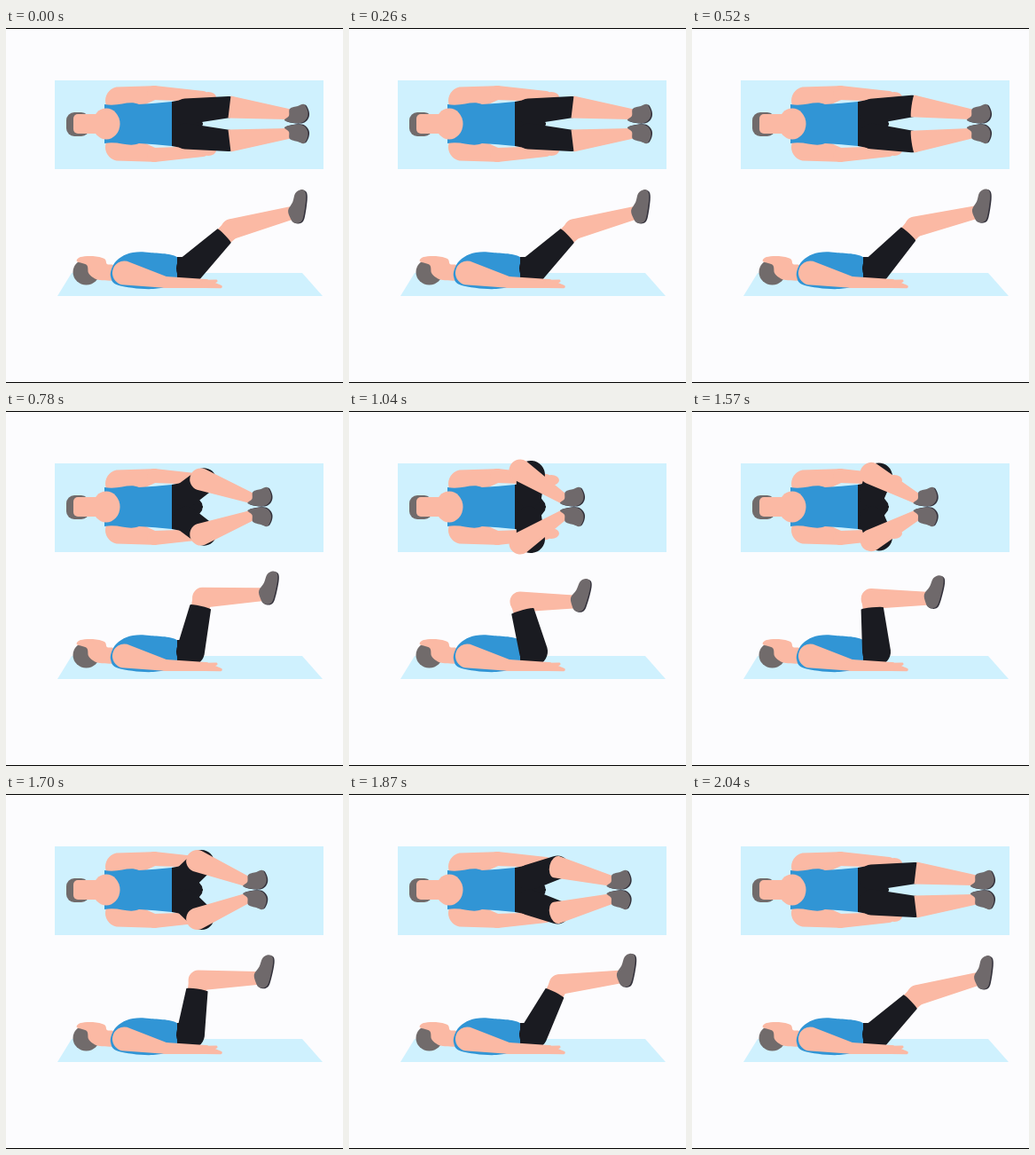
Animation, 380 px wide and 400 px high, one loop 2.14 s. Source, as an HTML page with a canvas:

```html
<!DOCTYPE html>
<html lang="en">
<head>
<meta charset="utf-8">
<title>Lying knee tuck</title>
<style>
html, body { margin: 0; width: 100%; height: 100%; overflow: hidden; background: #fcfcfe; }
canvas { display: block; }
</style>
</head>
<body>
<canvas id="stage" width="380" height="400"></canvas>
<script>
const ctx = document.getElementById('stage').getContext('2d');
const LOOP = 2140, STEPS = 13, MOVE = 520, DEG = Math.PI / 180;
const SKIN = '#fbb9a4', SHIRT = '#3195d5', SHORTS = '#1a1b21', HAIR = '#716b6b',
      SHOE = '#6f696b', SOLE = '#34323c', MAT = '#cff1fe';

const TOP_SHOE = [[-27, -4], [-22, -9], [-21, -17], [-12, -20], [-5, -22], [-1, -15], [-1, -8], [-6, -2], [-16, -1]];
const SIDE_SHOE = [[-11, 3], [-6, -6], [-3, -16], [3, -20], [8, -18], [9, -9], [6, 11], [2, 17], [-5, 17], [-9, 11]];

const lerp = (a, b, p) => a + (b - a) * p;
const mix = (a, b, p) => [lerp(a[0], b[0], p), lerp(a[1], b[1], p)];
const polar = ([x, y], angle, len) => [x + len * Math.cos(angle), y - len * Math.sin(angle)];

function fill(color, trace) {
  ctx.beginPath();
  trace();
  ctx.fillStyle = color;
  ctx.fill();
}

const rect = (color, x, y, w, h, r = 0) => fill(color, () => ctx.roundRect(x, y, w, h, r));
const oval = (color, x, y, rx, ry) => fill(color, () => ctx.ellipse(x, y, rx, ry, 0, 0, 2 * Math.PI));
const poly = (color, pts) => fill(color, () => pts.forEach(q => ctx.lineTo(...q)));

// Smooth closed curve through the points
function blob(color, pts) {
  const n = pts.length, at = i => pts[(i + n) % n];
  const handle = (i, s) => at(i).map((v, k) => v + s * (at(i + 1)[k] - at(i - 1)[k]) / 6);
  fill(color, () => {
    ctx.moveTo(...pts[0]);
    pts.forEach((_, i) => ctx.bezierCurveTo(...handle(i, 1), ...handle(i + 1, -1), ...at(i + 1)));
  });
}

function placed([x, y], angle, draw) {
  ctx.save();
  ctx.translate(x, y);
  ctx.rotate(angle);
  draw();
  ctx.restore();
}

// Tapered limb; a cap of 1 is a round end, 0 a flat one
function limb(color, a, ra, b, rb, capA = 1, capB = 1) {
  const dx = b[0] - a[0], dy = b[1] - a[1], q = Math.PI / 2;
  placed(a, Math.atan2(dy, dx), () => fill(color, () => {
    ctx.ellipse(0, 0, ra * capA, ra, 0, q, 3 * q);
    ctx.ellipse(Math.hypot(dx, dy), 0, rb * capB, rb, 0, -q, q);
  }));
}

function shoe(pos, angle, pts) {
  placed(pos, angle, () => {
    placed([1.5, 0.6], 0, () => blob(SOLE, pts));
    blob(SHOE, pts);
  });
}

// Draws once and again mirrored about the body axis
function bothSides(draw) {
  draw();
  ctx.save();
  ctx.translate(0, 216);
  ctx.scale(1, -1);
  draw();
  ctx.restore();
}

function topView(p) {
  rect(MAT, 55, 59, 303, 100);
  bothSides(() => {
    const elbow = [167, 73], wrist = [222, 77];
    limb(SKIN, [128, 82], 16, elbow, 8);
    limb(SKIN, elbow, 8, wrist, 6);
    oval(SKIN, 228, 78, 9, 6);
    fill(SHIRT, () => {
      ctx.moveTo(111, 109);
      ctx.lineTo(111, 86);
      ctx.bezierCurveTo(128, 89, 138, 81, 150, 86);
      ctx.quadraticCurveTo(168, 85, 187, 83);
      ctx.lineTo(190, 109);
    });
  });
  oval(SKIN, 113, 108, 15.5, 17.5);
  rect(HAIR, 68, 95, 26, 27, 9);
  rect(SKIN, 76, 97, 30, 22, 5);

  const knee = mix([252, 89], [193, 67], p), ankle = mix([318, 97], [242, 99], p);
  const thighEnd = [knee[0] + 12 * p * p, knee[1] + 5 * p * p];
  bothSides(() => {
    poly(SHORTS, [[187, 83], [203, 80], [221, 104], [222, 109], [187, 109]]);
    limb(SHORTS, [203, 94], 14.5, thighEnd, lerp(12, 16, p));
  });
  bothSides(() => {
    limb(SKIN, knee, 12.5, ankle, 6, Math.min(1, 2 * p));
    shoe([lerp(341, 265, p), 108], 0, TOP_SHOE);
  });
}

function sideView(p) {
  poly(MAT, [[74, 276], [334, 276], [357, 302], [58, 302]]);
  oval(HAIR, 90.5, 275, 15, 14.5);
  blob(SKIN, [[80, 263], [84, 258], [98, 257], [111, 260], [114, 266], [122, 268], [126, 283],
    [106, 284], [98, 281], [93, 276], [91, 267]]);
  blob(SHIRT, [[118, 280], [121, 267], [130, 258], [143, 253], [162, 253], [194, 259], [195, 285],
    [166, 294], [127, 290]]);

  // Thigh swings on the hip, the shin levels out
  const hip = [208, 271], swing = lerp(44, 105, p) * DEG;
  const hem = polar(hip, swing, 53 - 6 * p * p), knee = polar(hem, swing, 11);
  const ankle = polar(knee, 15 * DEG * (1 - p) ** 2, 69 - 9 * p * p);
  limb(SKIN, hem, 10.5, knee, 11);
  limb(SKIN, knee, 11.5, ankle, 7.5);
  poly(SHORTS, [[193, 258], [206, 258], [215, 285], [193, 285]]);
  limb(SHORTS, hip, 16, hem, lerp(11, 13, p), 1, 0.1);
  shoe([ankle[0] + 8.5, ankle[1] - 6.5], 0.13 * p, SIDE_SHOE);

  const elbow = [180, 286.5], wrist = [225, 288];
  limb(SKIN, [133.5, 276], 13.5, elbow, 6.5);
  limb(SKIN, elbow, 6.5, wrist, 5);
  limb(SKIN, wrist, 5, [242, 291.5], 1.8);
  limb(SKIN, wrist, 4.5, [237, 285], 1.5);
}

// 0 = legs out, 1 = tucked
function tuck(t) {
  const part = start => Math.max(0, Math.min(1, (Math.floor((t - start) * 12 / MOVE + 0.001) + 1) / STEPS));
  if (t >= 1520) return 1 - part(1520);
  const u = part(520);
  return lerp(u, u * u * (3 - 2 * u), 0.4);
}

function draw(time) {
  const p = tuck(time % LOOP);
  rect('#fcfcfe', 0, 0, 380, 400);
  topView(p);
  sideView(p);
  rect('#000', 0, 0, 380, 1);
  rect('#000', 0, 399, 380, 1);
}

let begin;
function frame(now) {
  begin ??= now;
  draw(now - begin);
  requestAnimationFrame(frame);
}
draw(0);
requestAnimationFrame(frame);
</script>
</body>
</html>
```
